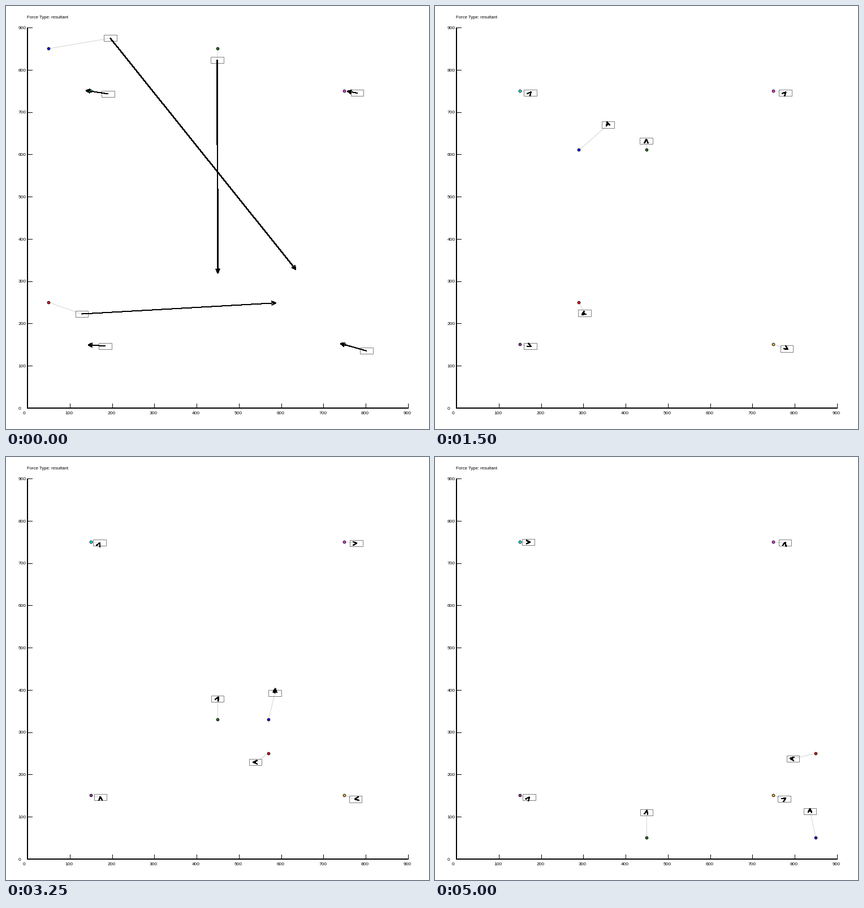
Recreate the animation shown at these times as a matplotlib script. Size 748 by 748 pixels, loop 5050 ms.

```python
import matplotlib.pyplot as plt
import numpy as np
from matplotlib.animation import FuncAnimation
from matplotlib.patches import Rectangle

SIZE, DPI = 748, 100
FRAMES, STEP_MS = 101, 50
LEFT, BASE, SCALE = 38, 711, 673 / 900
BOX = np.array([30, 15]) * SCALE
HEAD, HALF = 7, 3.2

plt.rcParams["font.family"] = "Liberation Sans"
fig = plt.figure(figsize=(SIZE / DPI, SIZE / DPI), dpi=DPI, facecolor="white")
ax = fig.add_axes([0, 0, 1, 1])
ax.set_xlim(0, SIZE)
ax.set_ylim(SIZE, 0)
ax.axis("off")


def px(n):
    """Pixels to points."""
    return n * 72 / DPI


def to_stage(x, y):
    return np.array([LEFT + x * SCALE, BASE - y * SCALE])


def ease(t, curve):
    """0 to 1; a positive curve moves early, a negative one late."""
    return (1 - np.exp(-curve * t)) / (1 - np.exp(-curve))


def line(xs=(), ys=(), width=1, color="black", z=1, aa=False):
    return ax.plot(xs, ys, color=color, lw=px(width), zorder=z, antialiased=aa,
                   solid_capstyle="butt", solid_joinstyle="miter")[0]


def text(x, y, s, size=8.3):
    ax.text(x, y, s, fontsize=px(size), ha="left", va="center_baseline")


def draw_axes():
    line([LEFT, LEFT], [LEFT, BASE + 1], 2)
    line([LEFT - 1, BASE], [BASE, BASE], 2)
    for v in range(0, 901, 100):
        x, y = to_stage(v, v)
        if v:
            line([x, x], [BASE - 8, BASE])
            line([LEFT, LEFT + 8], [y, y])
        text(x - 8.3, 719, str(v))
        text(21.7, y + .3, str(v))
    text(37.3, 19.7, "Force Type: resultant", 7.75)


class Label:
    """A data point, its drifting box and the force arrow on the box."""

    def __init__(self, color, start, velocity, offset, end, curve,
                 kick, pull, seed):
        self.start, self.velocity = np.array(start), np.array(velocity)
        self.offset, self.end = np.array(offset), np.array(end)
        self.curve = np.array(curve)
        self.kick, self.pull = np.array(kick), np.array(pull)
        rng = np.random.default_rng(seed)
        self.noise = rng.standard_t(3, (FRAMES, 2)).clip(-12, 12)
        self.noise[0] = -self.pull
        self.link = line(color="#d3d3d3", z=2, aa=True)
        self.box = ax.add_patch(Rectangle((0, 0), *BOX, fill=False,
                                          ec="#808080", lw=px(1), zorder=3))
        self.dot, = ax.plot([], [], "o", ms=px(4.7), mfc=color, mec="black",
                            mew=px(.9), zorder=4)
        self.shaft = line(z=5)
        self.head = line(width=1.2, z=5)

    def draw(self, f):
        p = to_stage(*(self.start + self.velocity * f))
        t = ease(f / (FRAMES - 1), self.curve)
        c = p + self.offset + (self.end - self.offset) * t
        v = self.pull + self.noise[f] + self.kick * 0.5 ** f
        tip = c + v
        u = v / max(np.hypot(*v), 1e-6)
        side = HALF * np.array([-u[1], u[0]])
        back = tip - HEAD * u
        self.link.set_data(*zip(p, c))
        self.box.set_xy(c - BOX / 2)
        self.dot.set_data([p[0] - .4], [p[1] - .4])
        self.shaft.set_data(*zip(c, tip))
        self.shaft.set_linewidth(px(max(1, 1.8 * abs(u[1]))))
        self.head.set_data(*zip(back + side, tip, back - side))


draw_axes()
labels = [
    Label("#0000ff", (50, 850), (8, -8), (109, -18.5), (-10.6, -47),
          (1.67, 8.6), (328, 409), (0, -6), 1),
    Label("#008000", (450, 850), (0, -8), (-1, 20.5), (-.5, -45),
          (1, 2.4), (1, 376), (0, -4), 2),
    Label("#ff0000", (50, 250), (8, 0), (58.6, 20.5), (-40.6, 9.5),
          (1.75, -1.7), (343, -19.5), (-4, .5), 3),
    Label("#00ffff", (150, 750), (0, 0), (30.4, 5.2), (14.8, .2),
          (5, .5), (-39, -6), (1.5, 0), 4),
    Label("#ff33ff", (750, 750), (0, 0), (22.2, 3.7), (20.4, 1.7),
          (5, .5), (-17, -3), (1, 0), 5),
    Label("#993399", (150, 150), (0, 0), (25.3, 2.4), (16.3, 2.9),
          (5, 1), (-30, -2), (.5, -.5), 6),
    Label("#ffb733", (750, 150), (0, 0), (38.7, 11), (18.8, 6),
          (5, 5), (-46, -13), (2, .5), 7),
]


def update(f):
    for label in labels:
        label.draw(f)
    return []


anim = FuncAnimation(fig, update, frames=FRAMES, interval=STEP_MS,
                     init_func=lambda: update(0), repeat=True, repeat_delay=0)
plt.show()
```
